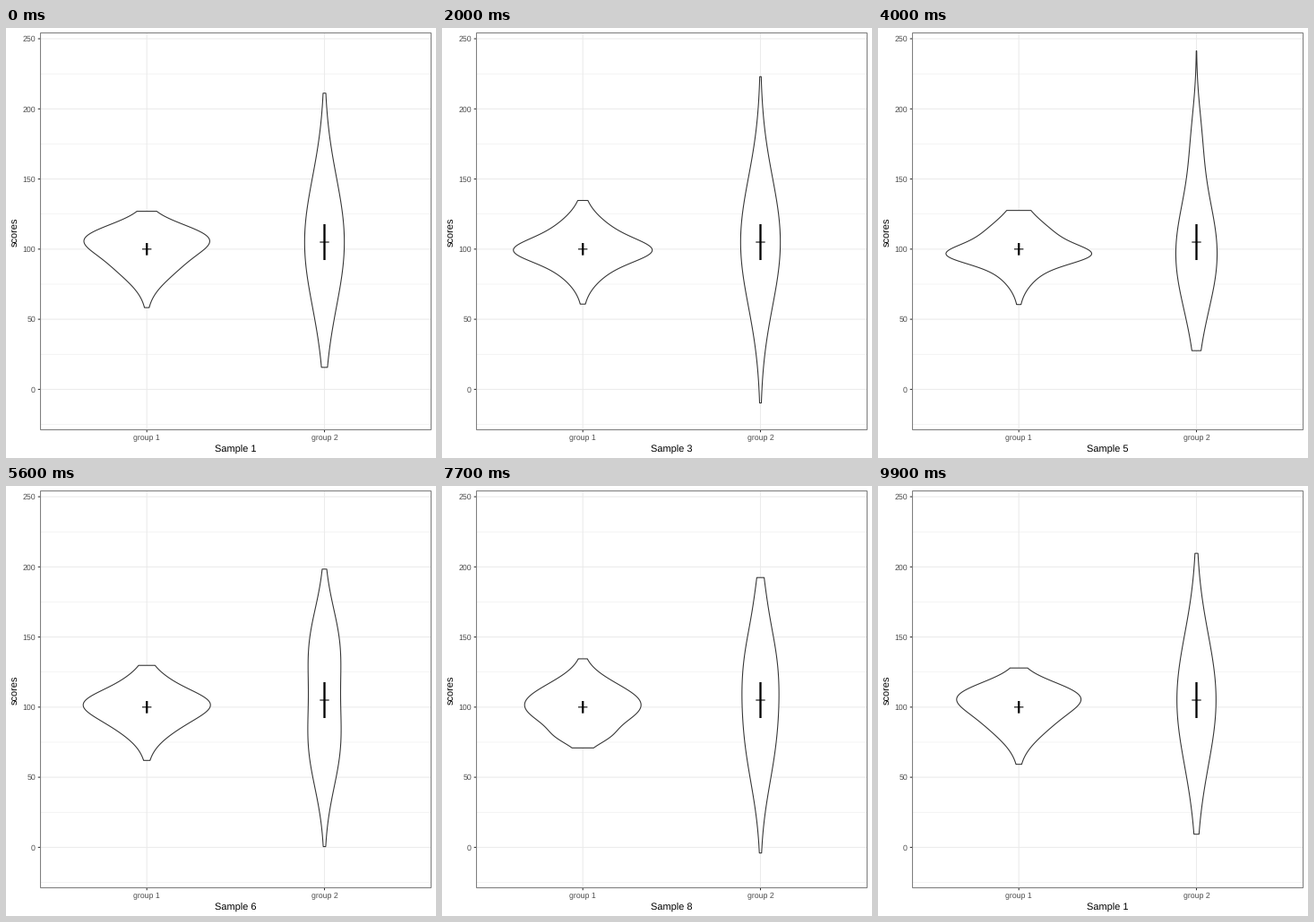
Recreate the animation shown at these times as a matplotlib script. Size 480x480 px, loop 10000 ms.

```python
import numpy as np
import matplotlib.pyplot as plt
from matplotlib.animation import FuncAnimation
from matplotlib.patches import Polygon, Rectangle

SIZE, DPI = 480, 80
PT = 72 / DPI                     # points per pixel
LINE = 1.07
LEFT, RIGHT, TOP, BOTTOM = 38.5, 474.5, 5.5, 448.5
INK, GRID = "#333333", "#EBEBEB"
STEPS, HOLD = 10, 5
AREA = 2555                       # shared by all violins, pixels times scores

# Every sample of a group has the same mean and deviation. It is cut to
# (low, high) and may hold a second cluster: share, centre, deviation.
GROUPS = [
    dict(x=157.2, mean=100, dev=15.2, reach=6.8, samples=[
        (58.3, 127, 0.40, 109, 9.5),
        (63, 132, 0.30, 98, 6),
        (60.8, 134.7, 0.19, 99, 7),
        (62, 131, 0.20, 97, 9),
        (60.5, 127.6, 0.20, 96, 6),
        (61, 128.7, 0.35, 103, 9),
        (66, 134, 0.15, 125, 7),
        (71.5, 133, 0.35, 112, 12),
        (70, 136.6, 0.16, 78, 6),
        (63, 131.5, 0.45, 108, 10),
    ]),
    dict(x=355.5, mean=105, dev=46, reach=20, samples=[
        (15.7, 211.2),
        (5, 208),
        (-9.7, 223),
        (5, 215),
        (27.6, 241.3, 0.10, 180, 25),
        (2.7, 196.5, 0.40, 146, 28),
        (-8, 206, 0.55, 136, 30),
        (-1.5, 192.5, 0.50, 137, 31),
        (-7.8, 192.2, 0.06, 185, 18),
        (-15.8, 203.5),
    ]),
]
COUNT = len(GROUPS[0]["samples"])


def score_y(score):
    return 403.4 - 1.5656 * score


def normal(v, mean, dev):
    return np.exp(-0.5 * ((v - mean) / dev) ** 2) / (dev * np.sqrt(2 * np.pi))


def outline(group, low, high, share=0, centre=0, spread=1):
    """Violin outline; the main cluster balances the second one."""
    mean, dev = group["mean"], group["dev"]
    rest = 1 - share
    main = (mean - share * centre) / rest
    second = share * (spread**2 + (centre - mean) ** 2)
    main_dev = np.sqrt((dev**2 - second) / rest - (main - mean) ** 2)
    v = np.linspace(high, low, 200)
    half = AREA * (rest * normal(v, main, main_dev)
                   + share * normal(v, centre, spread))
    x = np.concatenate([group["x"] - half, (group["x"] + half)[::-1]])
    y = score_y(v)
    return np.column_stack([x, np.concatenate([y, y[::-1]])])


plt.rcParams["font.family"] = "Liberation Sans"
plt.rcParams["text.hinting"] = "none"
fig = plt.figure(figsize=(SIZE / DPI, SIZE / DPI), dpi=DPI, facecolor="white")
ax = fig.add_axes([0, 0, 1, 1])
ax.set_xlim(0, SIZE)
ax.set_ylim(SIZE, 0)
ax.axis("off")


def line(x, y, color=INK, width=LINE, z=1):
    ax.plot(x, y, color=color, lw=width * PT, zorder=z, snap=False,
            solid_capstyle="butt")


def label(x, y, text, size, color, **align):
    return ax.text(x, y, text, fontsize=size * PT, color=color, va="baseline",
                   rotation_mode="anchor", **align)


for score in range(-25, 250, 50):
    line([LEFT, RIGHT], [score_y(score)] * 2, GRID, LINE / 2)
for score in range(0, 251, 50):
    y = score_y(score)
    line([LEFT, RIGHT], [y, y], GRID)
    line([LEFT - 2.75, LEFT], [y, y])
    label(33, y + 3.2, str(score), 8.8, "#4D4D4D", ha="right")

for number, group in enumerate(GROUPS, 1):
    x, y, reach = group["x"], score_y(group["mean"]), group["reach"]
    line([x, x], [TOP, BOTTOM], GRID)
    line([x, x], [BOTTOM, BOTTOM + 2.75])
    label(x, 460, f"group {number}", 8.8, "#4D4D4D", ha="center")
    # Mean and interval marker
    line([x, x], [y - reach, y + reach], "black", 2.3, 4)
    line([x - 5.2, x + 5.2], [y, y], "black", LINE, 5)

ax.add_patch(Rectangle((LEFT, TOP), RIGHT - LEFT, BOTTOM - TOP, fill=False,
                       ec="#7F7F7F", lw=LINE * PT, zorder=6, snap=False))
label(14, 227.5, "scores", 11, "black", ha="center", rotation=90)
title = label(256.5, 474, "", 11, "black", ha="center")

shapes = [[outline(g, *sample) for sample in g["samples"]] for g in GROUPS]
violins = [ax.add_patch(Polygon(poses[0], closed=True, fc="white", ec=INK,
                                lw=LINE * PT, zorder=3, snap=False))
           for poses in shapes]


def draw(frame):
    state, step = divmod(frame, STEPS)
    after = (state + 1) % COUNT
    mix = max(0, step - HOLD) / (STEPS - HOLD)
    for violin, poses in zip(violins, shapes):
        violin.set_xy(poses[state] * (1 - mix) + poses[after] * mix)
    title.set_text(f"Sample {(after if mix > 0.5 else state) + 1}")
    return [*violins, title]


anim = FuncAnimation(fig, draw, frames=COUNT * STEPS, interval=100,
                     repeat=True, repeat_delay=0, blit=False)
plt.show()
```
